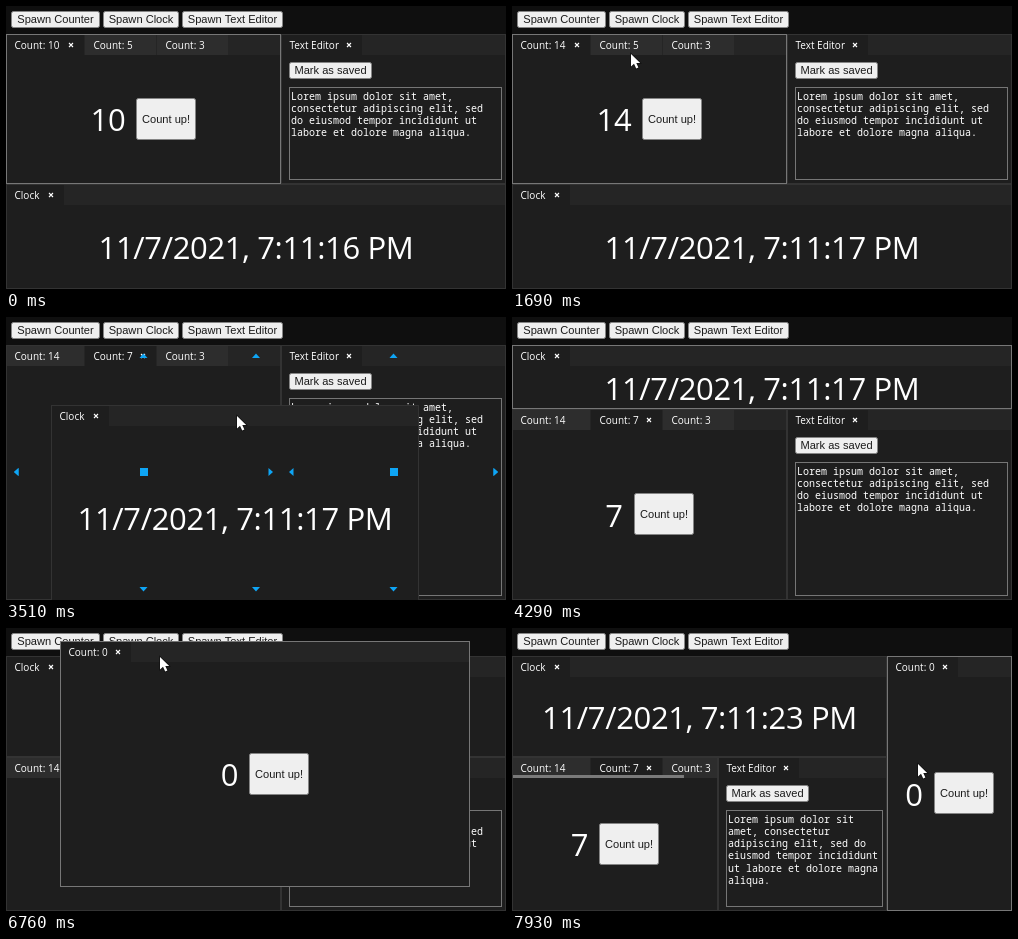
Recreate the animation shown at these times as an HTML page with a canvas. Size 500 by 283 pixels, loop 8000 ms.

```html
<!DOCTYPE html>
<html lang="en">
<head>
<meta charset="utf-8">
<style>
  html, body { margin: 0; height: 100%; overflow: hidden; background: #0f0f0f; }
  canvas { display: block; }
</style>
</head>
<body>
<canvas id="stage" width="500" height="283"></canvas>
<script>
const ctx = document.getElementById('stage').getContext('2d');
const LOOP = 8000, STEP = 130, TAB_H = 21;
const FONT = {
  tab: '500 10px "Open Sans", "Noto Sans", sans-serif',
  big: '31px "Open Sans", "Noto Sans", sans-serif',
  button: '11.1px "Liberation Sans", Arial, sans-serif',
  mono: '500 10px "Noto Sans Mono", "DejaVu Sans Mono", monospace'
};
const LOREM = 'Lorem ipsum dolor sit amet, consectetur adipiscing elit, sed do eiusmod ' +
  'tempor incididunt ut labore et dolore magna aliqua.';

const T = {
  select: 1820, detach: 2860, dock: 4030,
  spawn: 6240, grab: 6890, dockRight: 7540
};
// Pointer path: time, x, y
const PATH = [
  [390, 170, 128], [1300, 170, 128], [1690, 119, 48], [1820, 110, 40], [2080, 155, 118],
  [2340, 155, 118], [2730, 190, 189], [2860, 190, 189], [3510, 231, 99], [4030, 250, 39],
  [5330, 140, 128], [5720, 135, 30], [6110, 60, 14], [6370, 60, 14], [6760, 154, 29],
  [6890, 154, 28], [7410, 490, 155], [7540, 490, 155], [7930, 406, 136]
];

const clamp01 = v => Math.min(1, Math.max(0, v));
const lerp = (a, b, k) => a + (b - a) * k;
const passed = (t, times) => times.filter(s => t >= s).length;

function pointer(t) {
  const i = Math.max(1, PATH.findIndex(p => p[0] >= t));
  const [a, b] = t >= PATH.at(-1)[0] ? PATH.slice(-2) : [PATH[i - 1], PATH[i]];
  const k = clamp01((t - a[0]) / (b[0] - a[0]));
  return [Math.round(lerp(a[1], b[1], k)), Math.round(lerp(a[2], b[2], k))];
}

function fill(color, x, y, w, h) {
  ctx.fillStyle = color;
  ctx.fillRect(x, y, w, h);
}

function outline(color, x, y, w, h) {
  ctx.strokeStyle = color;
  ctx.lineWidth = 1;
  ctx.strokeRect(x + .5, y + .5, w - 1, h - 1);
}

function setFont(font) {
  ctx.font = font;
  ctx.letterSpacing = font === FONT.big ? '-0.35px' : '0px';
}

function text(str, x, y, font, color = '#fff', align = 'left') {
  setFont(font);
  ctx.fillStyle = color;
  ctx.textAlign = align;
  ctx.fillText(str, x, y);
}

function button(label, x, y, w, h) {
  ctx.beginPath();
  ctx.roundRect(x + .5, y + .5, w - 1, h - 1, 2);
  ctx.fillStyle = '#efefef';
  ctx.strokeStyle = '#858585';
  ctx.lineWidth = 1;
  ctx.fill();
  ctx.stroke();
  text(label, x + w / 2, y + h / 2 + 3.5, FONT.button, '#1a1a1a', 'center');
}

// Panel contents; each gets the whole panel box
const clock = seconds => (x, y, w, h) =>
  text(`11/7/2021, 7:11:${seconds} PM`, x + w / 2, y + (h + TAB_H) / 2 + 12, FONT.big, '#fff', 'center');

const counter = value => (x, y, w, h) => {
  setFont(FONT.big);
  const numW = ctx.measureText(value).width;
  const left = x + w / 2 - (numW + 71) / 2, cy = y + (h + TAB_H) / 2;
  text(value, left, cy + 11.5, FONT.big);
  button('Count up!', Math.round(left + numW + 11), Math.floor(cy - 21.5), 60, 42);
};

const editor = (x, y, w, h) => {
  button('Mark as saved', x + 8, y + 28, 83, 17);
  outline('#767676', x + 8, y + 53, w - 12, h - 57);
  const cols = Math.floor((w - 16) / 6.03);
  const lines = [''];
  for (const word of LOREM.split(' ')) {
    const last = lines.at(-1), joined = last ? last + ' ' + word : word;
    if (joined.length > cols) lines.push(word);
    else lines[lines.length - 1] = joined;
  }
  lines.forEach((line, i) => text(line, x + 10, y + 65.5 + i * 12.3, FONT.mono));
};

const tabWidth = label =>
  label === 'Clock' ? 59 : label === 'Text Editor' ? 82 : label.length > 8 ? 79 : 72;

function panel([x, y, w, h], tabs, active, content, border = '#333') {
  ctx.save();
  ctx.beginPath();
  ctx.rect(x, y, w, h);
  ctx.clip();
  fill('#1e1e1e', x, y, w, h);
  fill('#252525', x, y, w, TAB_H);
  let tx = x;
  tabs.forEach((label, i) => {
    const tw = tabWidth(label);
    fill(i === active ? '#1e1e1e' : '#2d2d2d', tx, y, tw - 1, TAB_H);
    text(label, tx + 8.5, y + 15, FONT.tab);
    if (i === active) {
      ctx.strokeStyle = '#fff';
      ctx.lineWidth = 1.1;
      const cx = tx + tw - 14, cy = y + 11;
      ctx.beginPath();
      ctx.moveTo(cx - 2, cy - 2); ctx.lineTo(cx + 2, cy + 2);
      ctx.moveTo(cx + 2, cy - 2); ctx.lineTo(cx - 2, cy + 2);
      ctx.stroke();
    }
    tx += tw;
  });
  if (tx > x + w) fill('#7a7a7a', x + 1, y + 18, w * .83, 3);
  content(x, y, w, h);
  outline(border, x, y, w, h);
  ctx.restore();
}

function arrow(x, y, dx, dy) {
  ctx.beginPath();
  ctx.moveTo(x + dx * 2.5, y + dy * 2.5);
  ctx.lineTo(x - dx * 2 + dy * 4, y - dy * 2 + dx * 4);
  ctx.lineTo(x - dx * 2 - dy * 4, y - dy * 2 - dx * 4);
  ctx.fill();
}

function dropTargets(boxes) {
  ctx.fillStyle = '#0ea5f5';
  [[0, 28, 500, 255], ...boxes].forEach(([x, y, w, h], i) => {
    const cx = x + w / 2, cy = y + h / 2 - .5;
    arrow(cx, y + 11, 0, -1);
    arrow(cx, y + h - 11, 0, 1);
    arrow(x + 10.5, cy, -1, 0);
    arrow(x + w - 10.5, cy, 1, 0);
    if (i) ctx.fillRect(Math.round(cx) - 4, Math.round(cy) - 4, 8, 8);
  });
}

function cursor(x, y) {
  ctx.save();
  ctx.translate(x, y);
  const shape = new Path2D('M0 0V12.5L3 9.8L5.2 14.6L7.4 13.6L5.3 9H9.2Z');
  ctx.strokeStyle = '#111';
  ctx.lineWidth = 1.4;
  ctx.stroke(shape);
  ctx.fillStyle = '#fff';
  ctx.fill(shape);
  ctx.restore();
}

function draw(t) {
  const [mx, my] = pointer(t);
  const first = 10 + passed(t, [520, 710, 910, 1170]);
  const second = 5 + passed(t, [2210, 2340]);
  const seconds = t < 1040 ? 16 : t < 6890 ? 17 : t < 7410 ? 22 : 23;
  const docked = t >= T.dock, right = t >= T.dockRight;
  const dragClock = t >= T.detach && !docked;
  const spawned = t >= T.spawn, dragNew = t >= T.grab && !right;
  const split = Math.round(lerp(92, 129, clamp01((t - 4420) / 520)));

  const width = right ? 375 : 500, mid = right ? 206 : 275;
  const top = docked ? split : 28;
  const bottom = docked || dragClock ? 283 : 178;
  const countBox = [0, top, mid, bottom - top];
  const editBox = [mid, top, width - mid, bottom - top];
  const clockBox = dragClock ? [mx - 186, my - 11, 368, 205]
    : docked ? [0, 28, width, split - 28] : [0, 178, 500, 105];

  const focus = on => on ? '#777' : '#333';
  const drawClock = () => panel(clockBox, ['Clock'], 0, clock(seconds),
    focus(docked && !spawned));

  fill('#0f0f0f', 0, 0, 500, 283);
  button('Spawn Counter', 5, 5, 89, 17);
  button('Spawn Clock', 97, 5, 76, 17);
  button('Spawn Text Editor', 176, 5, 101, 17);

  if (!dragClock) drawClock();
  panel(editBox, ['Text Editor'], 0, editor);
  const active = t >= T.select ? 1 : 0;
  panel(countBox, [`Count: ${first}`, `Count: ${second}`, 'Count: 3'], active,
    counter(active ? second : first), focus(t < T.detach));
  if (dragClock) drawClock();

  if (spawned) {
    const box = right ? [375, 28, 125, 255]
      : dragNew ? [mx - 100, my - 15, 410, 246] : [54, 13, 410, 246];
    panel(box, ['Count: 0'], 0, counter(0), focus(!dragNew));
  }

  if (dragClock) dropTargets([countBox, editBox]);
  if (dragNew) dropTargets([countBox, editBox, clockBox]);
  if (t >= 390 && (t < 4160 || t >= 5330)) cursor(mx, my);
}

function tick() {
  const t = performance.now() % LOOP;
  draw(Math.floor(t / STEP) * STEP);
  requestAnimationFrame(tick);
}
tick();
</script>
</body>
</html>
```
